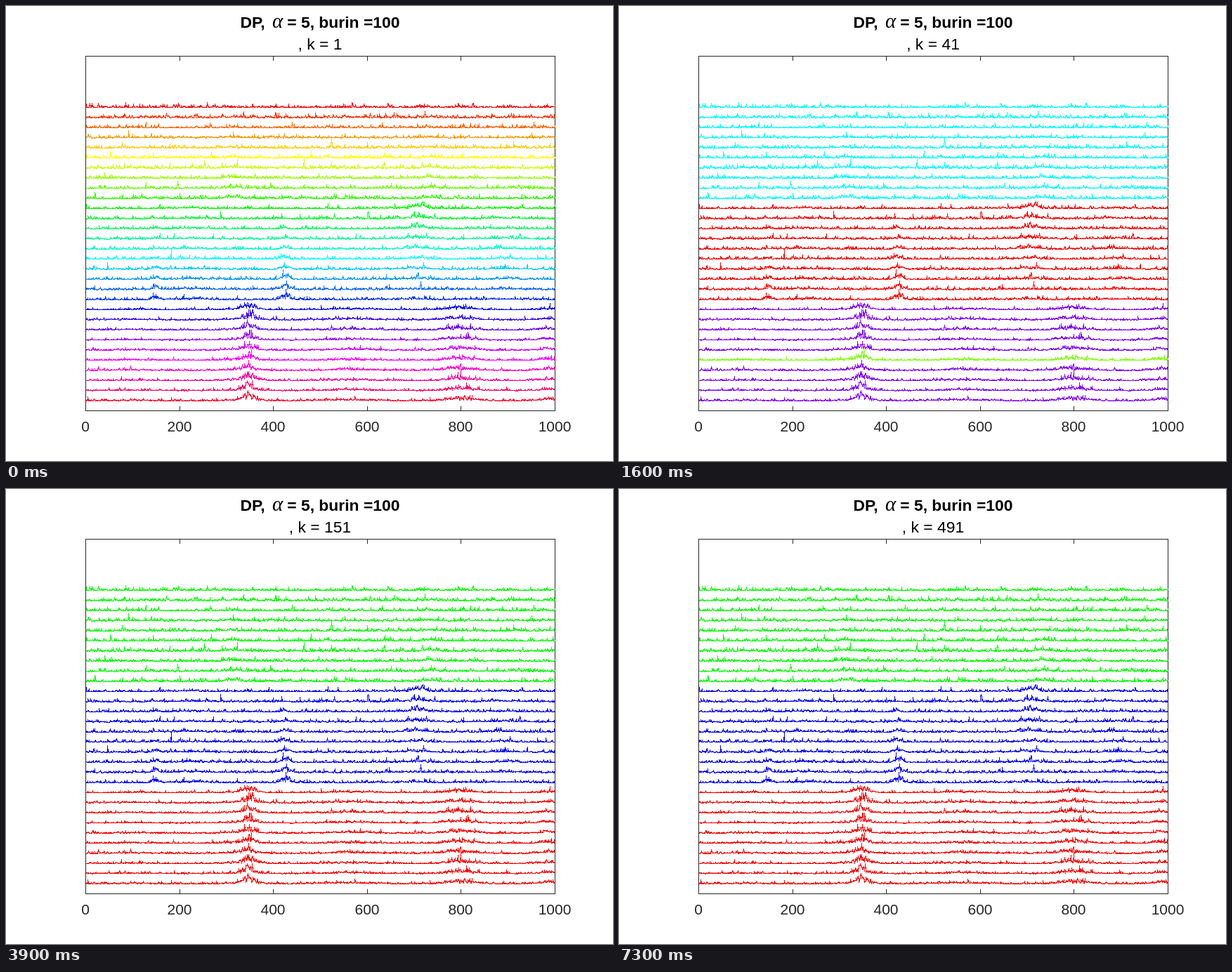
Write an HTML page with a canvas that moves like this. It is 864x648 px and loops after 7400 ms.

```html
<!DOCTYPE html>
<html lang="en">
<head>
<meta charset="utf-8">
<title>Cluster sampling</title>
<style>
  html, body { margin: 0; width: 100%; height: 100%; overflow: hidden; background: #fff; }
  canvas { display: block; }
</style>
</head>
<body>
<canvas id="stage" width="864" height="648"></canvas>
<script>
const ctx = document.getElementById('stage').getContext('2d');
const LOOP = 7400, ROWS = 30, BAND = 10, POINTS = 1000;
const LEFT = 113, RIGHT = 781, TOP = 71, BOTTOM = 576, CENTER = 447;
const SANS = '"Liberation Sans", Arial, sans-serif';

const range = n => Array.from({ length: n }, (_, i) => i);
const bump = (at, width, first, last = first) => ({ at, width, first, last });

// Three kinds of signal; bump heights run from the first to the last row of a band.
const SIGNALS = [
  { noise: 1.3, bumps: [bump(312, 12, .3, 2.4), bump(734, 11, .3, 2.4)] },
  { noise: 1.1, bumps: [
    bump(712, 14, 4, 0), bump(425, 8, 0, 6), bump(148, 6, 0, 4),
    bump(225, 32, .9), bump(690, 28, .9), bump(890, 30, .9)] },
  { noise: .75, bumps: [
    bump(349, 11, 6), bump(335, 32, 1.6), bump(100, 38, .7),
    bump(565, 45, 1.5), bump(797, 28, 3.4), bump(985, 20, 2.2)] }
];

// Hues are steps on a wheel of the given size, spread evenly over the rows;
// strays are single rows or short runs that sit in another cluster.
const state = (wheel, hues, ...strays) => ({ wheel, hues, strays });
const stray = (hue, from, to = from) => ({ hue, from, to });
const STATES = [
  state(ROWS, range(ROWS)),
  state(6, [1, 5, 0, 4, 2, 3]),
  state(5, [1, 0, 2], stray(4, 10), stray(3, 17, 20)),
  state(4, [3, 0, 1], stray(2, 17, 20)),
  state(4, [2, 0, 3], stray(1, 26)),
  state(4, [2, 3, 0], stray(1, 25)),
  state(3, [2, 1, 0]),
  state(3, [1, 2, 0])
];

function random(seed) {
  return () => {
    seed = (seed + 0x6D2B79F5) | 0;
    let v = Math.imul(seed ^ (seed >>> 15), 1 | seed);
    v = (v + Math.imul(v ^ (v >>> 7), 61 | v)) ^ v;
    return ((v ^ (v >>> 14)) >>> 0) / 4294967296;
  };
}

function makeTrace(row) {
  const rnd = random(row * 977 + 1);
  const exponential = () => -Math.log(1 - rnd());
  const { noise, bumps } = SIGNALS[Math.floor(row / BAND)];
  const progress = (row % BAND) / (BAND - 1);
  const base = 562 - 14.4 * (ROWS - 1 - row);
  const envelope = i => bumps.reduce((sum, { at, width, first, last }) =>
    sum + (first + (last - first) * progress) * Math.exp(-(((i - at) / width) ** 2) / 2), 0);

  const path = new Path2D();
  const column = (x, a, b) => path.rect(x, Math.min(a, b), 1, Math.abs(a - b) + 1);
  let lastX, lastY;
  for (let i = 1; i <= POINTS; i++) {
    const lift = (exponential() + exponential() + exponential()) / 3;
    const value = Math.min(15, noise * exponential() + envelope(i) * lift);
    const x = Math.round(LEFT + i * (RIGHT - LEFT) / POINTS);
    const y = Math.round(base - value);
    if (i > 1) {
      const middle = Math.round((y + lastY) / 2);
      column(lastX, lastY, middle);
      column(x, middle, y);
    }
    lastX = x;
    lastY = y;
  }
  return path;
}

const traces = range(ROWS).map(makeTrace);

function text(value, x, y, font, align = 'center', color = '#000') {
  ctx.font = font;
  ctx.textAlign = align;
  ctx.fillStyle = color;
  ctx.fillText(value, x, y);
}

function drawAxes() {
  ctx.strokeStyle = '#262626';
  ctx.lineWidth = 1;
  ctx.strokeRect(LEFT + .5, TOP + .5, RIGHT - LEFT, BOTTOM - TOP);
  for (let tick = 0; tick <= 1000; tick += 200) {
    const x = Math.round(LEFT + tick * (RIGHT - LEFT) / 1000);
    ctx.fillStyle = '#262626';
    ctx.fillRect(x, TOP, 1, 7);
    ctx.fillRect(x, BOTTOM - 6, 1, 7);
    text(tick, x, 606, '21px ' + SANS, 'center', '#262626');
  }
}

function drawTitle(k) {
  const bold = 'bold 22.9px ' + SANS;
  text('DP,', 333.5, 31, bold, 'left');
  text('α', 386.5, 31, 'italic 29px "Liberation Serif", serif');
  text('= 5, burin =100', 560.5, 31, bold, 'right');
  text(', k = ' + k, CENTER, 62, '22.9px ' + SANS);
}

function drawTraces({ wheel, hues, strays }) {
  traces.forEach((trace, row) => {
    const odd = strays.find(s => row + 1 >= s.from && row + 1 <= s.to);
    const hue = odd ? odd.hue : hues[Math.floor(row * hues.length / ROWS)];
    ctx.fillStyle = `hsl(${360 * hue / wheel}, 100%, 50%)`;
    ctx.fill(trace);
  });
}

function draw(step) {
  ctx.fillStyle = '#fff';
  ctx.fillRect(0, 0, 864, 648);
  drawAxes();
  drawTitle(1 + 10 * step);
  drawTraces(STATES[Math.min(step, STATES.length - 1)]);
}

// Slow steps first, then four times as fast.
const stepAt = t => t < 3200 ? Math.floor(t / 400) : 8 + Math.floor((t - 3200) / 100);

let shown = -1;
function tick() {
  const step = stepAt(performance.now() % LOOP);
  if (step !== shown) draw(shown = step);
  requestAnimationFrame(tick);
}
tick();
</script>
</body>
</html>
```
